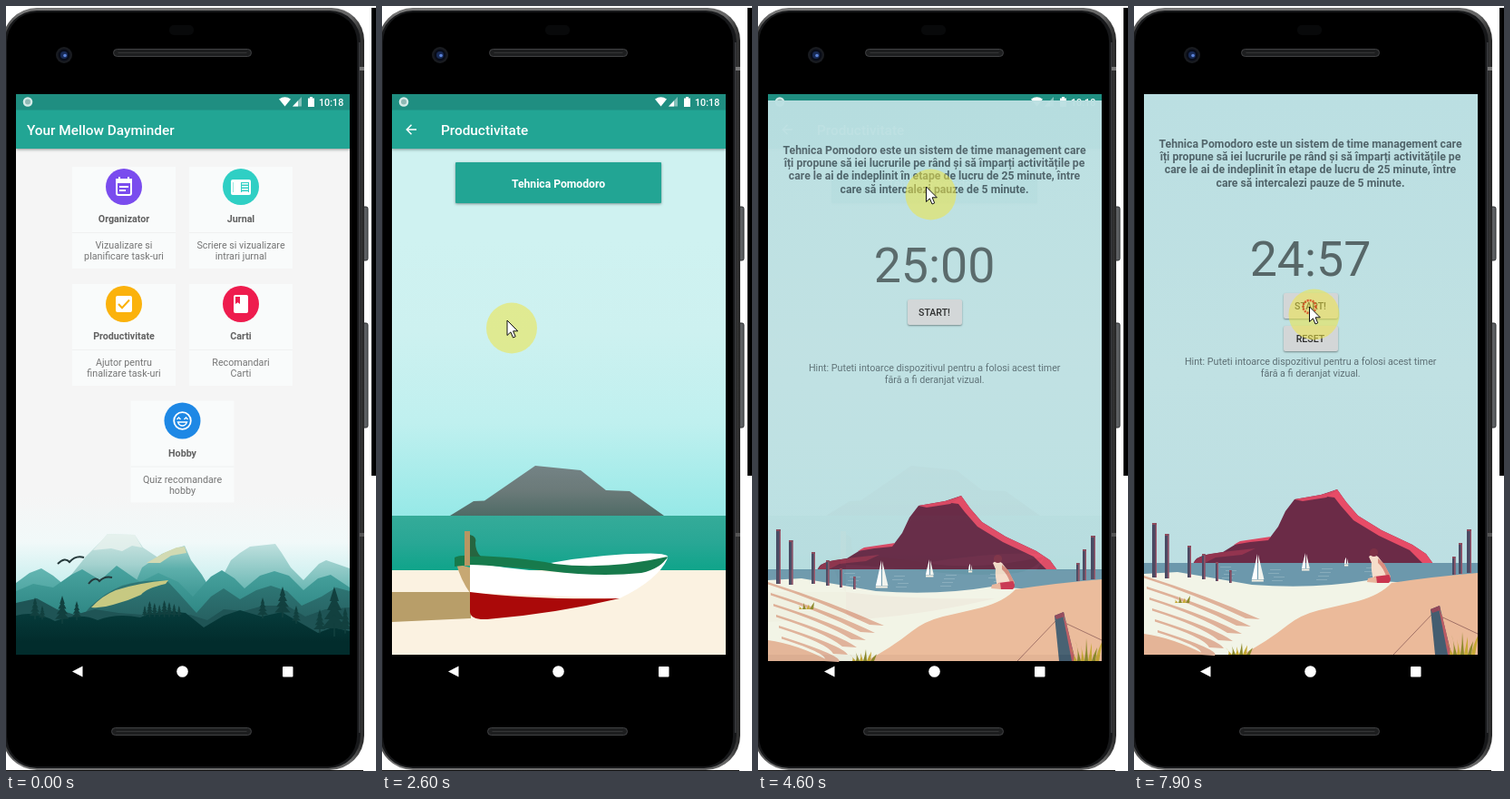
An HTML page with a canvas for the animation above (8 s loop, 408 px wide and 842 px high).

```html
<!DOCTYPE html>
<html lang="ro">
<head>
<meta charset="utf-8">
<title>Phone walkthrough</title>
<style>
html, body { margin: 0; width: 100%; height: 100%; overflow: hidden; background: #fff; }
canvas { display: block; }
</style>
</head>
<body>
<canvas id="stage" width="408" height="842"></canvas>
<script>
const W = 408, H = 842, LOOP = 8000;
const SCREEN = { x: 11, y: 97, w: 368, h: 654 };
const FONT = 'Roboto, "Noto Sans", sans-serif';
const TEAL = '#22a594';
const GREY = 'rgba(0,0,0,.54)';
const stage = document.getElementById('stage').getContext('2d');
let c = stage;

// ---------- helpers ----------
function layer(draw) {
  const cv = document.createElement('canvas');
  cv.width = W;
  cv.height = H;
  c = cv.getContext('2d');
  draw();
  c = stage;
  return cv;
}
function rect(x, y, w, h, fill) {
  c.fillStyle = fill;
  c.fillRect(x, y, w, h);
}
function round(x, y, w, h, r, fill, line, lw = 1) {
  c.beginPath();
  c.roundRect(x, y, w, h, r);
  if (fill) { c.fillStyle = fill; c.fill(); }
  if (line) { c.strokeStyle = line; c.lineWidth = lw; c.stroke(); }
}
function disc(x, y, r, fill) {
  c.beginPath();
  c.arc(x, y, r, 0, 7);
  c.fillStyle = fill;
  c.fill();
}
function shape(d, fill) {
  c.fillStyle = fill;
  c.fill(new Path2D(d));
}
function line(d, color, lw = 1) {
  c.strokeStyle = color;
  c.lineWidth = lw;
  c.stroke(new Path2D(d));
}
function fade(y0, y1, ...cols) {
  const g = c.createLinearGradient(0, y0, 0, y1);
  cols.forEach((col, i) => g.addColorStop(i / (cols.length - 1), col));
  return g;
}
function text(s, x, y, size, color, weight = 400, align = 'center') {
  c.font = `${weight} ${size}px ${FONT}`;
  c.textAlign = align;
  c.fillStyle = color;
  c.fillText(s, x, y);
}
function withShadow(blur, dy, draw) {
  c.save();
  c.shadowColor = 'rgba(0,0,0,.4)';
  c.shadowBlur = blur;
  c.shadowOffsetY = dy;
  draw();
  c.restore();
}

// ---------- shared bars ----------
function bars(title, back) {
  withShadow(3, 1, () => rect(11, 114, 368, 43, TEAL));
  rect(11, 97, 368, 17.5, '#1f8e81');
  disc(24, 105.5, 5.3, '#d5ebe8');
  disc(24, 105.5, 3, '#8fb9b5');
  shape('M301 102.5Q307.500 98 314 102.500L307.500 110.500Z', '#fff');
  shape('M316 110.500H326V100Z', 'rgba(255,255,255,.45)');
  shape('M316 110.500H322V104.200Z', '#fff');
  shape('M333 101.500H335V100H338V101.500H340V111H333Z', '#fff');
  text('10:18', 345, 109.5, 10.74, '#fff', 500, 'left');
  if (back) line('M38 136H27.500M32.500 130.800L27.300 136L32.500 141.200', '#fff', 1.5);
  text(title, back ? 65 : 23, 142, 15.35, '#fff', 500, 'left');
}

// ---------- home ----------
const icons = {
  note() {
    round(-8, -8, 16, 17, 2, null, '#fff', 2);
    rect(-9, -9, 18, 5, '#fff');
    rect(-6, -11, 2, 3, '#fff');
    rect(4, -11, 2, 3, '#fff');
    rect(-5, -1, 10, 2, '#fff');
    rect(-5, 3, 7, 2, '#fff');
  },
  reader() {
    round(-11, -8, 22, 17, 2, '#fff');
    rect(0, -5, 9, 11, '#2fcfc4');
    for (let y = -4; y < 6; y += 3) rect(1, y, 7, 1.5, '#fff');
    rect(-9, -5, 1, 11, '#9fe6e0');
  },
  check() {
    round(-9, -9, 18, 18, 2, '#fff');
    line('M-6 0L-2 4.200L6 -4.500', '#fbb20c', 2);
  },
  book() {
    round(-8, -10, 16, 20, 2, '#fff');
    shape('M-6 -8H-1V0L-3.500 -1.800L-6 0Z', '#ee1c4e');
  },
  smile() {
    c.beginPath();
    c.arc(0, 0, 9.3, 0, 7);
    c.strokeStyle = '#fff';
    c.lineWidth = 1.8;
    c.stroke();
    line('M-6 -1.500L-4 -3.500L-2 -1.500M2 -1.500L4 -3.500L6 -1.500', '#fff', 1.4);
    line('M-5 1.500H5Q3.500 5.500 0 5.500Q-3.500 5.500 -5 1.500Z', '#fff', 1.3);
  }
};
function card(x, y, color, icon, title, a, b) {
  rect(x - 57, y - 22, 114, 112, '#f9fbfb');
  rect(x - 57, y + 50, 114, 1, '#f0f1f1');
  disc(x, y, 20, color);
  c.save();
  c.translate(x, y);
  icons[icon]();
  c.restore();
  text(title, x, y + 39, 10.7, '#616161', 700);
  text(a, x, y + 68, 10.74, '#757575');
  text(b, x, y + 80, 10.74, '#757575');
}
function tree(x, base, h, color) {
  for (let i = 0; i < 4; i++) {
    const top = base - h + i * h * 0.2, half = h * (0.1 + i * 0.06);
    shape(`M${x} ${top}L${x + half} ${top + h * 0.32}H${x - half}Z`, color);
  }
  rect(x - 0.8, base - h * 0.2, 1.6, h * 0.3, color);
}
function mountains() {
  rect(11, 540, 368, 174, fade(540, 640, '#f5f5f5', '#f1f9f9', '#c6eeee'));
  // far ranges
  shape('M222 660L248 610L258 602L269 595L297 592L304 602L314 618L328 632L345 614L353 610L379 619V670H222Z', fade(592, 650, '#bfe0de', '#5fb2ae'));
  shape('M11 635L26 624L39 619L52 627L64 637V670H11Z', fade(619, 655, '#64b6b2', '#49a09d'));
  shape('M46 665L72 626L88 606L104 590L112 581L142 582L151 596L166 606L190 660Z', fade(580, 650, '#d4e9e6', '#a3d1ce', '#53a8a4'));
  shape('M96 599L112 581L142 582L150 596L139 594L128 600L116 597Z', 'rgba(236,244,240,.75)');
  shape('M130 665L150 618L172 603L187 597L197 594L204 610L216 626L236 660Z', fade(594, 645, '#a3d2ce', '#5dafab', '#439b98'));
  shape('M155 613L174 602L188 596L197 595L199 602L182 605L170 613Z', '#d2dab3');
  // middle ranges
  shape('M11 644L30 636L52 640L72 626L84 620L104 632L122 616L148 634L168 624L190 634L206 650L226 628L238 621L252 630L263 641L280 627L296 622L312 627L328 643L344 630L358 626L379 640V714H11Z', fade(615, 670, '#4aa5a1', '#2f8784'));
  shape('M70 690L92 662Q110 645 128 638Q152 631 178 633L192 648L210 668L226 650L240 641L258 653L276 643L292 638L310 644L326 660L348 650L364 640L379 644V714H70Z', fade(632, 680, '#2f7977', '#265f60'));
  shape('M94 662Q106 649 121 643Q145 635 179 632L176 636Q154 641 149 648Q134 655 118 659Q106 663 94 662Z', '#c7c982');
  shape('M11 657L34 652L56 664L76 670L98 664L124 668L150 670H203L222 676L240 664L262 666L284 660L310 660L330 672L352 664L379 662V714H11Z', '#1f5455');
  shape('M11 671Q31 665 54 677Q82 667 101 676Q122 668 148 673Q166 664 198 668L218 684L240 671L258 665L282 672L304 667L344 690L360 684L379 688V714H11Z', fade(666, 700, '#063b3b', '#022c2c'));
  const dark = '#12403f';
  [[32, 673, 22], [40, 674, 14], [62, 677, 28], [78, 674, 19], [283, 672, 21], [305, 670, 31], [320, 678, 18], [346, 688, 24], [362, 689, 50], [374, 688, 26]]
    .forEach(t => tree(...t, dark));
  for (let i = 0; i < 8; i++) tree(153 + i * 5.4, 671, 11 + (i * 5 % 7), dark);
  line('M57 614Q65 606 70 612Q77 604 86 607M91 636Q98 627 103 633Q109 627 117 629', '#25393b', 2);
}
function home() {
  rect(11, 97, 368, 617, '#f5f5f5');
  mountains();
  bars('Your Mellow Dayminder');
  card(130, 199, '#7a4cee', 'note', 'Organizator', 'Vizualizare si', 'planificare task-uri');
  card(259, 199, '#2fcfc4', 'reader', 'Jurnal', 'Scriere si vizualizare', 'intrari jurnal');
  card(130, 328, '#fbb20c', 'check', 'Productivitate', 'Ajutor pentru', 'finalizare task-uri');
  card(259, 328, '#ee1c4e', 'book', 'Carti', 'Recomandari', 'Carti');
  card(194.5, 456.5, '#1e88e5', 'smile', 'Hobby', 'Quiz recomandare', 'hobby');
}

// ---------- boat page ----------
function boatPage() {
  rect(11, 97, 368, 464, fade(157, 561, '#cff2f1', '#cff2f1', '#cdf1f0', '#bff0ef', '#96e9e7'));
  shape('M75 561L101 545L113 544.500L169 506L219 511L247 533L273 534L311 561Z', fade(506, 561, '#748385', '#6b7a79', '#4f6b66'));
  rect(11, 561, 368, 60, fade(561, 621, '#35ab99', '#28a795', '#0fa48a'));
  rect(11, 621, 368, 93, '#fbf2e1');
  shape('M11 645H98V674L11 678Z', '#b89e69');
  shape('M82 614L97 618V646Q87 632 82 614Z', '#c7a873');
  shape('M186 613Q240 603 296 602.500Q317 603 315 607L300 618H200Z', '#fff');
  shape('M97 612Q170 625 240 625Q290 623 315 608Q304 632 262 652L97 646Z', '#fff');
  shape('M97 645Q170 654 262 652Q190 669 116 675Q98 676 97 667Z', '#aa0909');
  shape('M80 607Q86 604 97 605Q150 606 190 614Q250 621 315 606Q308 619 286 624Q240 629 185 622Q130 616 97 615L80 617Z', '#177a4c');
  shape('M97 582Q105 584 103 591Q103 600 109 606H97Z', '#26653f');
  rect(91, 578, 6, 38, '#b89662');
  bars('Productivitate', true);
  withShadow(3, 1, () => round(81, 172, 227, 45, 1, TEAL));
  text('Tehnica Pomodoro', 194.5, 200, 12.15, '#fff', 700);
}

// ---------- timer page ----------
function post(x, top, base, w) {
  rect(x, top, w, base - top, '#4a4a63');
  rect(x, top, w, 2, '#8d4a5c');
  rect(x + w - 1.3, top + 2, 1.3, base - top - 2, '#a0566a');
}
function sail(x, top, base) {
  const h = base - top;
  shape(`M${x} ${top}Q${x - h * 0.15} ${base - 9} ${x - h * 0.2} ${base - 3}H${x}Z`, '#fff');
  shape(`M${x + 1} ${top + 1}L${x + h * 0.24} ${base - 3}H${x + 1}Z`, '#f1f3ee');
  rect(x - h * 0.2, base - 2.5, h * 0.42, 2, '#f9f3e5');
}
function grass(x, y, n, h) {
  for (let i = 0; i < n; i++) {
    const k = i - (n - 1) / 2, tip = h * (0.6 + (i * 3 % 5) / 10);
    shape(`M${x + k * 4 - 2} ${y}Q${x + k * 4} ${y - tip / 2} ${x + k * 6} ${y - tip}L${x + k * 4 + 2} ${y}Z`, i % 2 ? '#8d8a2c' : '#c6a935');
  }
}
function beach() {
  // headland: dark body, lit ridge and shoulder
  shape('M65 614Q68 606 80 604L98 601L116 590L150 585L159 573L167 556L177 543L206 538L224 532L234 546L247 561L273 577L307 593L322 603L330 614Z', '#6b2b47');
  shape('M206 539L224 532L234 546L247 561L273 577L307 593L322 603L330 614H319L304 599L270 583L242 566L228 550L221 541Z', '#e74c67');
  shape('M177 543L206 538L224 533L212 541L186 545Z', '#dc4965');
  shape('M110 593L117 589L151 584L148 588L128 590Z', '#dc4965');
  shape('M65 614Q70 605 84 603L106 600L134 597L119 604L90 607L76 614Z', '#93344f');
  rect(11, 613, 368, 30, '#6c98ac');
  for (let i = 0; i < 16; i++) rect(95 + i * 53 % 210, 617 + i * 7 % 16, 12, 0.8, 'rgba(220,235,235,.3)');
  sail(136, 603, 634);
  sail(189, 602, 622);
  sail(234, 607, 617);
  // pale dune on the left, warm dune on the right
  const cream = '#f2f4e7', sand = '#ebba9a';
  shape('M11 625L48 623Q90 630 130 637Q200 642 258 632L379 640V714H11Z', cream);
  shape('M379 624Q330 628 284 635Q272 648 247 655Q222 661 204 665Q184 670 170 681Q146 700 119 714H379Z', sand);
  for (let i = 0; i < 6; i++) {
    const y = 627 + i * 12, x = 11 + i * 3;
    shape(`M${x} ${y}Q${x + 70} ${y + 22} ${x + 128 - i * 13} ${y + 48 - i * 4}L${x + 112 - i * 13} ${y + 47 - i * 4}Q${x + 55} ${y + 20} ${x} ${y + 2.5}Z`, '#dfb199');
  }
  shape('M11 691Q42 695 79 714H11Z', '#e4b497');
  [[20, 569, 629], [34, 581, 630], [59, 594, 629], [75, 603, 631], [90, 612, 633], [105, 621, 635]]
    .forEach(([x, a, b], i) => post(x, a, b, 5 - i * 0.5));
  post(351, 606, 626, 3.5);
  post(358, 591, 625, 4);
  post(367, 576, 624, 5);
  line('M286 714L330 668L379 691', '#8d5d58', 0.8);
  shape('M327 664L337 660L350 714H332Z', '#445d70');
  shape('M327 664L337 660L338 665L329 668Z', '#93475a');
  shape('M336 662L340 672L350 714H346Z', '#bd5b63');
  grass(362, 714, 7, 25);
  grass(116, 714, 6, 13);
  grass(53, 657, 4, 8);
  // seated figure
  shape('M259 606Q263 602 269 606L276 615L283 628L279 632H264Q261 620 262 613Z', '#f5ddcb');
  shape('M269 608L276 614L283 628L279 630Q275 618 269 613Z', '#d98d7e');
  disc(264.5, 601.5, 4.6, '#7d3146');
  shape('M265 628L281 626Q285 631 281 635H267Z', '#c9354f');
  shape('M258 630L267 628L268 635L257 634Z', '#e9b69c');
}
function timerPage() {
  rect(11, 97, 368, 617, fade(97, 714, '#bbdfe2', '#c0e1e3', '#bbdee2'));
  beach();
  [
    'Tehnica Pomodoro este un sistem de time management care',
    'îți propune să iei lucrurile pe rând și să împarți activitățile pe',
    'care le ai de indeplinit în etape de lucru de 25 minute, între',
    'care să intercalezi pauze de 5 minute.'
  ].forEach((s, i) => text(s, 194.5, 155.7 + i * 14.35, 12.24, '#51646a', 700));
  text('Hint: Puteti intoarce dispozitivul pentru a folosi acest timer', 194.7, 395.2, 10.7, '#5d6f74');
  text('fără a fi deranjat vizual.', 194.7, 408, 10.7, '#5d6f74');
}
function button(label, y, pressed) {
  if (pressed) round(163.5, y - 0.5, 62, 29, 2, '#cfcbd5', '#d8b9c8');
  else withShadow(2, 1, () => round(165, y, 60, 28, 2, '#d3d6d7'));
  text(label, 194.5, y + 17.5, 10.6, '#2a2a2a', 500);
}
function timerState(t) {
  const left = t < RUN ? 1500 : 1499 - Math.floor((t - RUN) / 1000);
  const clock = Math.floor(left / 60) + ':' + String(left % 60).padStart(2, '0');
  text(clock, 194.5, 297, 53.7, GREY);
  button('START!', 316, t > 5300 && t < RUN);
  if (t >= RUN) button('RESET', 352);
}

// ---------- phone ----------
function phone() {
  rect(0, 0, W, H, '#fff');
  rect(403, 2, 5, 515, '#000');
  round(391, 221, 8, 59, 2, '#5d6063', '#2b2c2e');
  round(391, 349, 8, 115, 2, '#5d6063', '#2b2c2e');
  const rim = c.createLinearGradient(0, 0, 396, 0);
  rim.addColorStop(0, '#4b4b4b');
  rim.addColorStop(0.04, '#777');
  rim.addColorStop(0.96, '#666');
  rim.addColorStop(1, '#202020');
  round(-4, 2, 399, 839, [38, 36, 38, 38], rim);
  round(-2, 5, 393, 834, [36, 34, 36, 36], '#17181a');
  round(1, 7, 386, 830, [33, 32, 33, 33], '#000');
  rect(389, 40, 1.5, 760, '#3c3d40');
  rect(0, 841, 394, 1, '#111');
  rect(390, 67, 5, 4, '#777');
  rect(390, 580, 5, 4, '#555');
  round(180, 21, 27, 11, 5, '#08090a');
  for (const [x, y, w] of [[118.5, 47.5, 152], [116.5, 794.5, 154]]) {
    round(x, y, w, 8, 4, '#1d1e1f', '#414244');
    rect(x + 5, y + 3.5, w - 10, 1, '#343536');
  }
  disc(64, 54, 9, '#191b20');
  disc(64, 54, 6.5, '#080c18');
  disc(64, 54, 4, '#182a55');
  disc(65, 54.5, 1.8, '#5b83d8');
}
function navIcons() {
  shape('M73 732.500L84.500 726.500V738.500Z', '#fff');
  disc(194.5, 732.5, 6.3, '#fff');
  round(305, 727, 11.5, 11.5, 1, '#fff');
}

// ---------- motion ----------
const RUN = 5560;
const OPEN_BOAT = 2285, OPEN_TIMER = 4485;
const clicks = [1000, 3090, 5280, 7850];
const moves = [
  [150, 900, -45, 430, 138, 346],
  [2700, 3050, 138, 346, 185.5, 199],
  [4700, 5200, 185.5, 199, 187, 333],
  [5700, 6300, 187, 333, 193.5, 331]
];
const clamp = v => Math.max(0, Math.min(1, v));

function pointer(t) {
  let x = -99, y = 430;
  for (const [a, b, x0, y0, x1, y1] of moves) {
    if (t < a) break;
    const p = clamp((t - a) / (b - a)), e = p * p * (3 - 2 * p);
    x = x0 + (x1 - x0) * e;
    y = y0 + (y1 - y0) * e;
  }
  return [x, y];
}
function drawPointer(t) {
  const [x, y] = pointer(t);
  disc(x + 5, y + 8.5, 28, 'rgba(238,230,70,.55)');
  for (const at of clicks) {
    const age = t - at;
    if (age < 0 || age > 300) continue;
    c.save();
    c.globalAlpha = 0.85 * (1 - clamp((age - 80) / 220));
    c.setLineDash([2, 1]);
    c.beginPath();
    c.arc(x, y, 4 + 6.5 * clamp(age / 110), 0, 7);
    c.strokeStyle = '#d8461f';
    c.lineWidth = 2.4;
    c.stroke();
    c.restore();
  }
  c.save();
  c.translate(x, y);
  const arrow = 'M0 0V16.500L3.900 12.900L6.500 19L9.200 17.800L6.600 11.800H11.800Z';
  shape(arrow, '#fff');
  line(arrow, '#111', 1);
  c.restore();
}

const pages = {
  phone: layer(phone),
  home: layer(home),
  boat: layer(boatPage),
  timer: layer(timerPage)
};

// New page fades in while it rises by 8% of the screen height.
function openPage(age, draw) {
  if (age < 0) return;
  const rise = SCREEN.h * 0.08 * (1 - clamp(age / 350)) ** 5;
  const alpha = 1 - (1 - clamp(age / 200)) ** 4;
  const page = layer(() => {
    rect(SCREEN.x, SCREEN.y, SCREEN.w, SCREEN.h, '#000');
    draw();
  });
  c.globalAlpha = alpha;
  c.drawImage(page, 0, rise);
  c.globalAlpha = 1;
}
function render(t) {
  c.drawImage(pages.phone, 0, 0);
  c.save();
  c.beginPath();
  c.rect(SCREEN.x, SCREEN.y, SCREEN.w, SCREEN.h);
  c.clip();
  if (t < OPEN_BOAT + 350) c.drawImage(pages.home, 0, 0);
  if (t < OPEN_TIMER + 350) openPage(t - OPEN_BOAT, () => c.drawImage(pages.boat, 0, 0));
  openPage(t - OPEN_TIMER, () => {
    c.drawImage(pages.timer, 0, 0);
    timerState(t);
  });
  c.restore();
  navIcons();
  drawPointer(t);
}
const start = performance.now();
function tick() {
  render((performance.now() - start) % LOOP);
  requestAnimationFrame(tick);
}
tick();
</script>
</body>
</html>
```
